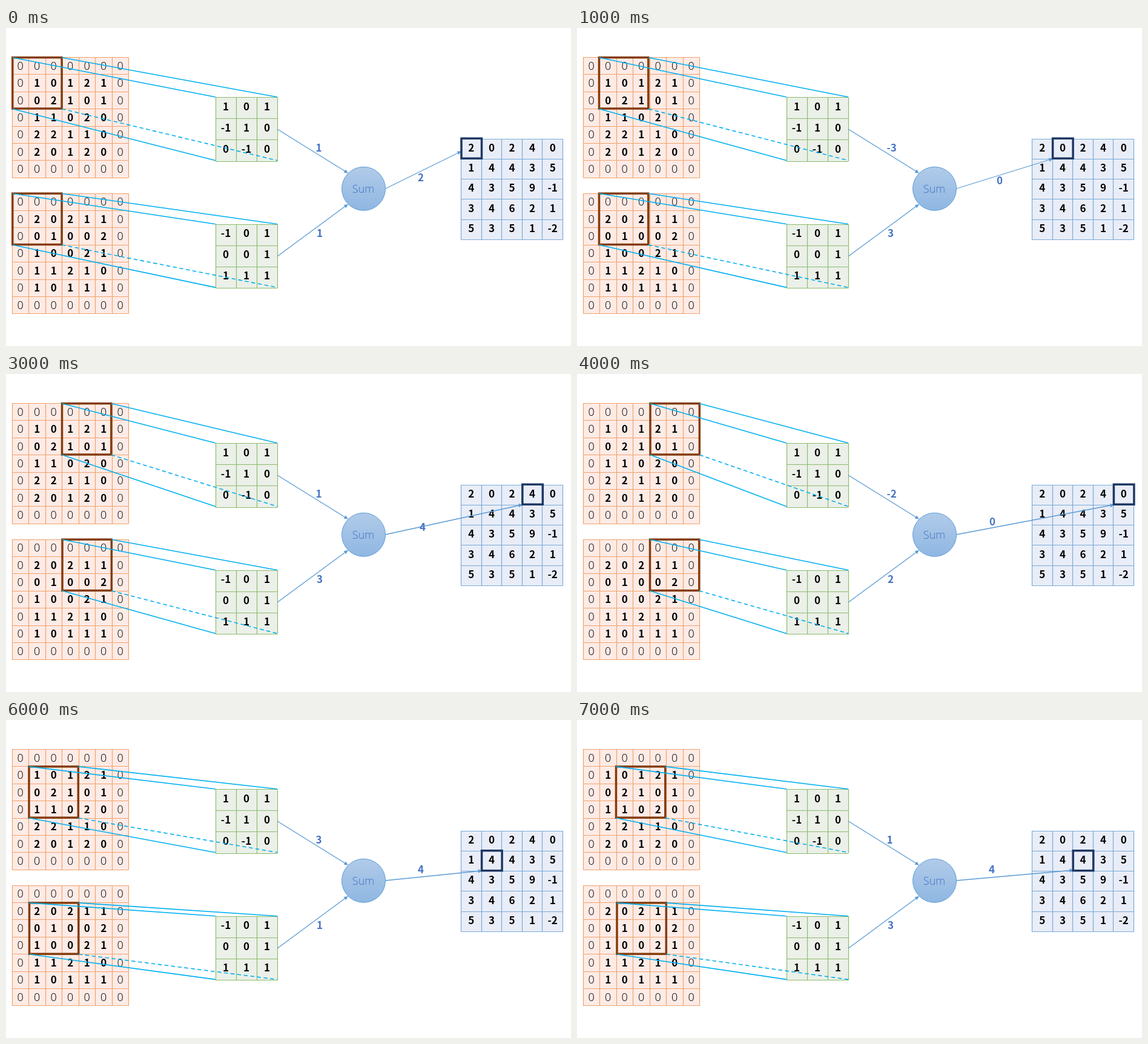
An HTML page with a canvas for the animation above (8 s loop, 933 px wide and 525 px high).

```html
<!DOCTYPE html>
<html>
<head>
<meta charset="utf-8">
<style>
html, body { margin: 0; overflow: hidden; background: #fff; }
canvas { display: block; }
</style>
</head>
<body>
<canvas id="stage" width="933" height="525"></canvas>
<script>
const ctx = document.getElementById('stage').getContext('2d');
const BOLD = 'bold 17px "Noto Sans CJK SC", "Noto Sans CJK JP", "Noto Sans", sans-serif';
const LIGHT = '300 18px "Open Sans", "Noto Sans", sans-serif';
const BLUE = '#5b9bd5', LABEL = '#4472c4';

const parse = rows => rows.split('/').map(row => row.split(' '));
const pad = rows => {
  const edge = [...'0000000'];
  return [edge, ...rows.split('/').map(row => [...`0${row}0`]), edge];
};

const inputStyle = { x: 10, y: 48.5, w: 27.5, h: 28.4, dy: 0, fill: '#fdebe6', line: '#f2a26b', padded: true };
const kernelStyle = { x: 346, y: 114.5, w: 34, h: 35.2, dy: -2.6, fill: '#ebf0e8', line: '#8dbb6d' };
const grids = [
  { ...inputStyle, cells: pad('10121/02101/11020/22110/20120') },
  { ...inputStyle, y: 273, cells: pad('20211/01002/10021/11210/10111') },
  { ...kernelStyle, cells: parse('1 0 1/-1 1 0/0 -1 0') },
  { ...kernelStyle, y: 324, cells: parse('-1 0 1/0 0 1/1 1 1') },
  { x: 751.5, y: 183, w: 33.6, h: 33.3, dy: -1.8, fill: '#e9edf7', line: '#79abd9',
    cells: parse('2 0 2 4 0/1 4 4 3 5/4 3 5 9 -1/3 4 6 2 1/5 3 5 1 -2') }
];

// Window x (upper, lower), three labels, output label centre, output arrow tip
const steps = [
  [10.8, 10.8, 1, 1, 2, 685, 247, 751, 204],
  [36.5, 36.5, -3, 3, 0, 698, 252, 785, 216],
  [64, 66, 0, 2, 2, 691, 262, 819, 216],
  [92.5, 93, 1, 3, 4, 688, 253, 852, 216],
  [121, 120.5, -2, 2, 0, 686, 244, 886, 216],
  [11.5, 11.2, -1, 2, 2, 685, 247, 746, 250],
  [38, 38.5, 3, 1, 4, 685, 247, 785, 249],
  [64.5, 66, 1, 3, 4, 685, 247, 819, 248]
];

function text(str, x, y, color, font = BOLD, align = 'center') {
  ctx.font = font;
  ctx.textAlign = align;
  ctx.fillStyle = color;
  ctx.fillText(str, x, y + 6);
}

function line(x1, y1, x2, y2, color, width = 1.3) {
  ctx.strokeStyle = color;
  ctx.lineWidth = width;
  ctx.beginPath();
  ctx.moveTo(x1, y1);
  ctx.lineTo(x2, y2);
  ctx.stroke();
}

function box(x, y, w, h, color) {
  ctx.strokeStyle = color;
  ctx.lineWidth = 3.5;
  ctx.strokeRect(x, y, w, h);
}

function arrow(x1, y1, x2, y2) {
  line(x1, y1, x2, y2, BLUE);
  ctx.save();
  ctx.translate(x2, y2);
  ctx.rotate(Math.atan2(y2 - y1, x2 - x1));
  ctx.fillStyle = BLUE;
  ctx.beginPath();
  ctx.moveTo(1, 0);
  ctx.lineTo(-5.5, -3.2);
  ctx.lineTo(-5.5, 3.2);
  ctx.fill();
  ctx.restore();
}

function drawGrid({ x, y, w, h, dy, fill, line: color, cells, padded }) {
  const n = cells.length, right = x + n * w, bottom = y + n * h;
  ctx.fillStyle = fill;
  ctx.fillRect(x, y, n * w, n * h);
  for (let i = 0; i <= n; i++) {
    const lx = Math.floor(x + i * w) + 0.5, ly = Math.floor(y + i * h) + 0.5;
    line(lx, y, lx, bottom, color, 1.2);
    line(x, ly, right, ly, color, 1.2);
  }
  cells.forEach((row, r) => row.forEach((value, c) => {
    const edge = padded && (r % (n - 1) === 0 || c % (n - 1) === 0);
    text(value, x + (c + 0.5) * w, y + (r + 0.5) * h + dy, '#000', edge ? LIGHT : BOLD);
  }));
}

function drawWindow(x, y, kernelY) {
  const w = 81.3, h = 84.3, cyan = '#00b0f0';
  box(x, y, w, h, '#843c0c');
  line(x, y, 346, kernelY, cyan, 1.6);
  line(x + w, y, 448, kernelY, cyan, 1.6);
  line(x, y + h + 0.5, 346, kernelY + 104.7, cyan, 1.6);
  ctx.setLineDash([6.5, 4.5]);
  line(x + w, y + h + 0.5, 448, kernelY + 104.7, cyan, 1.6);
  ctx.setLineDash([]);
}

function drawSum() {
  const shade = ctx.createLinearGradient(0, 229, 0, 301);
  shade.addColorStop(0, '#b1cbe9');
  shade.addColorStop(1, '#8fb7e2');
  ctx.beginPath();
  ctx.arc(590.5, 265.3, 36, 0, 2 * Math.PI);
  ctx.fillStyle = shade;
  ctx.fill();
  ctx.strokeStyle = BLUE;
  ctx.lineWidth = 1;
  ctx.stroke();
  text('Sum', 590, 265.5, LABEL, LIGHT);
}

function draw(now) {
  const step = Math.floor(now / 1000) % steps.length;
  const [upperX, lowerX, upper, lower, total, labelX, labelY, tipX, tipY] = steps[step];
  const col = step % 5, row = Math.floor(step / 5);
  ctx.fillStyle = '#fff';
  ctx.fillRect(0, 0, 933, 525);
  grids.forEach(drawGrid);
  drawWindow(upperX, 48.7 + row * 28.2, 114);
  drawWindow(lowerX, 273.2 + row * 28.7, 323.7);
  drawSum();
  arrow(448, 167, 564, 239);
  arrow(448, 377, 564, 291.5);
  arrow(627, 265, tipX, tipY);
  box(752 + col * 33.6, 182.3 + row * 33.4, 33.5, 33, '#1f3864');
  text(upper, 511.5, 198, LABEL, BOLD, 'left');
  text(lower, 513, 339, LABEL, BOLD, 'left');
  text(total, labelX, labelY, LABEL);
  requestAnimationFrame(draw);
}
requestAnimationFrame(draw);
</script>
</body>
</html>
```
